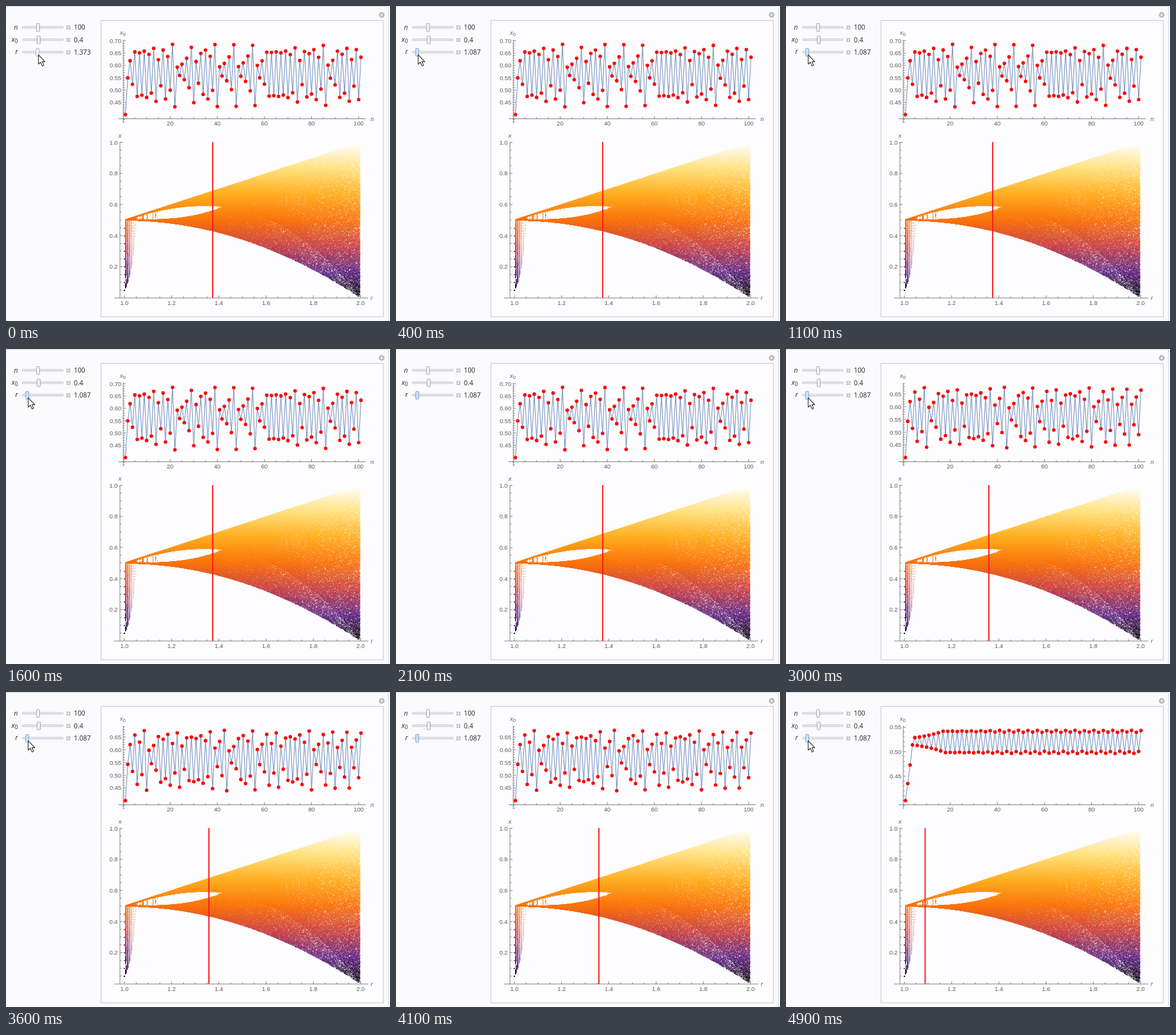
Animation, 600 px wide and 493 px high, one loop 5 s. Source, as an HTML page with a canvas:

```html
<!DOCTYPE html>
<html lang="en">
<head>
<meta charset="utf-8">
<title>Tent map</title>
<style>
  html, body { margin: 0; width: 600px; height: 493px; overflow: hidden; background: #fbfafc; }
  canvas, svg { position: absolute; left: 0; top: 0; width: 600px; height: 493px; }
  text { font: 9.4px "Liberation Sans", Arial, sans-serif; fill: #5c5c5c; }
  .end { text-anchor: end; }
  .mid { text-anchor: middle; }
  .ui { font: 10.3px "Open Sans", "Noto Sans", sans-serif; fill: #222; }
  .var { font-style: italic; }
  .axis { stroke: #666; stroke-width: .8; fill: none; }
</style>
</head>
<body>
<canvas id="fan" width="600" height="493"></canvas>
<svg id="stage" viewBox="0 0 600 493">
  <path d="M0 .5H597.5V493" fill="none" stroke="#d6d5d8"/>
  <rect x="148.5" y="22.5" width="441" height="464" fill="none" stroke="#c9c8cc"/>
  <circle cx="587" cy="14" r="4.4" fill="#b4b4b8"/>
  <path d="M584.5 14H589.5M587 11.5V16.5" stroke="#fff" stroke-width="1.2"/>
  <g id="panel"></g>
  <g id="fixed"></g>
  <g id="series"></g>
  <path id="mark" stroke="#fa1e1e" stroke-width="1.9"/>
  <path id="cursor" d="M0 0V14.5L3.4 11.5L6 17.4L8.4 16.3L5.9 10.6H10.3Z" fill="#fff" stroke="#333" stroke-width="1.1" stroke-linejoin="round"/>
</svg>
<script>
const $ = id => document.getElementById(id);
const text = (x, y, s, cls) => `<text x="${x}" y="${y}" class="${cls}">${s}</text>`;
const sub0 = '<tspan dy="2" font-size="80%" font-style="normal">0</tspan>';
const rx = r => 185 + 369 * (r - 1);
const xy = x => 456.6 - 243.2 * x;
const nx = n => 182.9 + 3.681 * n;

// Sunset colour ramp, black to white
const ramp = [[0, 0, 0], [95, 35, 129], [201, 66, 69], [250, 115, 13], [255, 174, 33], [255, 225, 125], [255, 255, 255]];
function color(x) {
  const p = Math.min(Math.max(x, 0), .9999) * 6, i = Math.floor(p), f = p - i;
  return `rgb(${ramp[i].map((c, k) => Math.round(c + (ramp[i + 1][k] - c) * f))})`;
}

const tent = (r, x) => r * Math.min(x, 1 - x);

function drawFan() {
  const g = $('fan').getContext('2d');
  g.fillStyle = '#fdfcfe';
  g.fillRect(149, 23, 440, 463);
  for (let i = 0; i < 369; i++) {
    if (i < 20 && i % 3 === 1) continue;
    const r = 1 + i / 369;
    for (let j = 1; j < 10; j++) {
      let x = j * .0497;
      for (let k = 0; k < 109; k++) {
        x = tent(r, x);
        if (k < 45) continue;
        g.fillStyle = color(x);
        g.fillRect(rx(r) - .7, xy(x) - .3, .9, .9);
      }
    }
  }
}

function slider(y, pos, name, value, id = '') {
  return text(18.5, y + 3, name, 'ui var end') +
    `<rect x="25.5" y="${y - 1.5}" width="64" height="2.6" rx="1.2" fill="#efeff1" stroke="#b9b9bd" stroke-width=".8"/>
    <rect ${id && `id="${id}"`} x="${pos - 2.3}" y="${y - 6}" width="4.8" height="12" rx=".8" fill="#f4f4f6" stroke="#a0a0a4" stroke-width=".9"/>
    <rect x="94.5" y="${y - 2.8}" width="6" height="6" fill="#bdbdc1"/>
    <path d="M95.5 ${y + .2}H99.5M97.5 ${y - 1.8}V${y + 2.2}" stroke="#fff" stroke-width=".9"/>
    <text ${id && `id="${id}Val"`} x="106" y="${y + 3.7}" class="ui">${value}</text>`;
}

function drawFixed() {
  $('panel').innerHTML = slider(33.5, 50, 'n', '100') + slider(53, 51, 'x' + sub0, '0.4') + slider(72.4, 49, 'r', '1.373', 'thumb');
  let d = 'M176 176.5H562M183.2 53V183M169 457H566M178 213V457', s = '';
  for (let n = 5; n <= 100; n += 5) {
    const big = n % 20 === 0;
    d += `M${nx(n)} 176.5v${big ? -4 : -2.4}`;
    if (big) s += text(nx(n), 187.3, n, 'mid');
  }
  for (let i = 0; i <= 20; i++) {
    const big = i % 4 === 0, v = i / 20;
    d += `M${rx(1 + v)} 457v${big ? -4 : -2.4}`;
    if (big) s += text(rx(1 + v), 468.2, (1 + v).toFixed(1), 'mid');
    if (!i) continue;
    d += `M178 ${xy(v)}h${big ? 4 : 2.4}`;
    if (big) s += text(174.6, xy(v) + 3.3, v.toFixed(1), 'end');
  }
  s += text(182.5, 44.5, 'x' + sub0, 'var mid') + text(572, 179.5, 'n', 'var mid') +
    text(178, 205.5, 'x', 'var mid') + text(571.5, 460, 'r', 'var mid');
  $('fixed').innerHTML = `<path class="axis" d="${d}"/>` + s;
}

function drawSeries(r) {
  const xs = [.4];
  while (xs.length < 101) xs.push(tent(r, xs[xs.length - 1]));
  const k = 110 / (Math.max(...xs) - .4), py = x => 170 - (x - .4) * k;
  let ticks = '', s = '';
  for (let i = 36; i <= 70; i++) {
    const y = py(i / 100), big = i % 5 === 0;
    if (y < 53 || y > 183) continue;
    ticks += `M183.2 ${y}h${big ? 4 : 2.4}`;
    if (big && i > 40) s += text(180.3, y + 3.3, (i / 100).toFixed(2), 'end');
  }
  const pts = xs.map((x, i) => [nx(i + 1).toFixed(2), py(x).toFixed(2)]);
  $('series').innerHTML = `<path class="axis" d="${ticks}"/>${s}
    <polyline points="${pts.join(' ')}" fill="none" stroke="#6a8bbb" stroke-width=".95"/>` +
    pts.map(([x, y]) => `<circle cx="${x}" cy="${y}" r="2.8" fill="#fa0505"/>`).join('');
  $('mark').setAttribute('d', `M${rx(r) + .3} 213V457`);
}

// Value of the last step that has begun
const at = (steps, t) => steps.filter(s => s[0] <= t).pop()[1];
const dragged = [[0, 1.373], [100, 1.357], [200, 1.23], [300, 1.087]];
const plotted = [[0, 1.373], [2500, 1.357], [4900, 1.087]];
const pointer = [[0, 1], [1900, 0], [2400, 1], [3900, 0], [4400, 1]];
const start = performance.now();
let shown;

function frame(now) {
  const t = Math.max(0, now - start) % 5000, r = at(dragged, t), p = at(plotted, t);
  const pos = 28.2 + 56 * (r - 1), thumb = $('thumb');
  thumb.setAttribute('x', pos - 2.3);
  thumb.setAttribute('fill', t < 100 ? '#f3f8fe' : '#cfe2f8');
  thumb.setAttribute('stroke', t < 100 ? '#93b4dc' : '#7f9fc9');
  $('thumbVal').textContent = r.toFixed(3);
  $('cursor').setAttribute('transform', `translate(${pos + 1.6} 76.5)`);
  $('cursor').style.visibility = at(pointer, t) ? 'visible' : 'hidden';
  if (p !== shown) drawSeries(shown = p);
  requestAnimationFrame(frame);
}

drawFan();
drawFixed();
frame(start);
</script>
</body>
</html>
```
